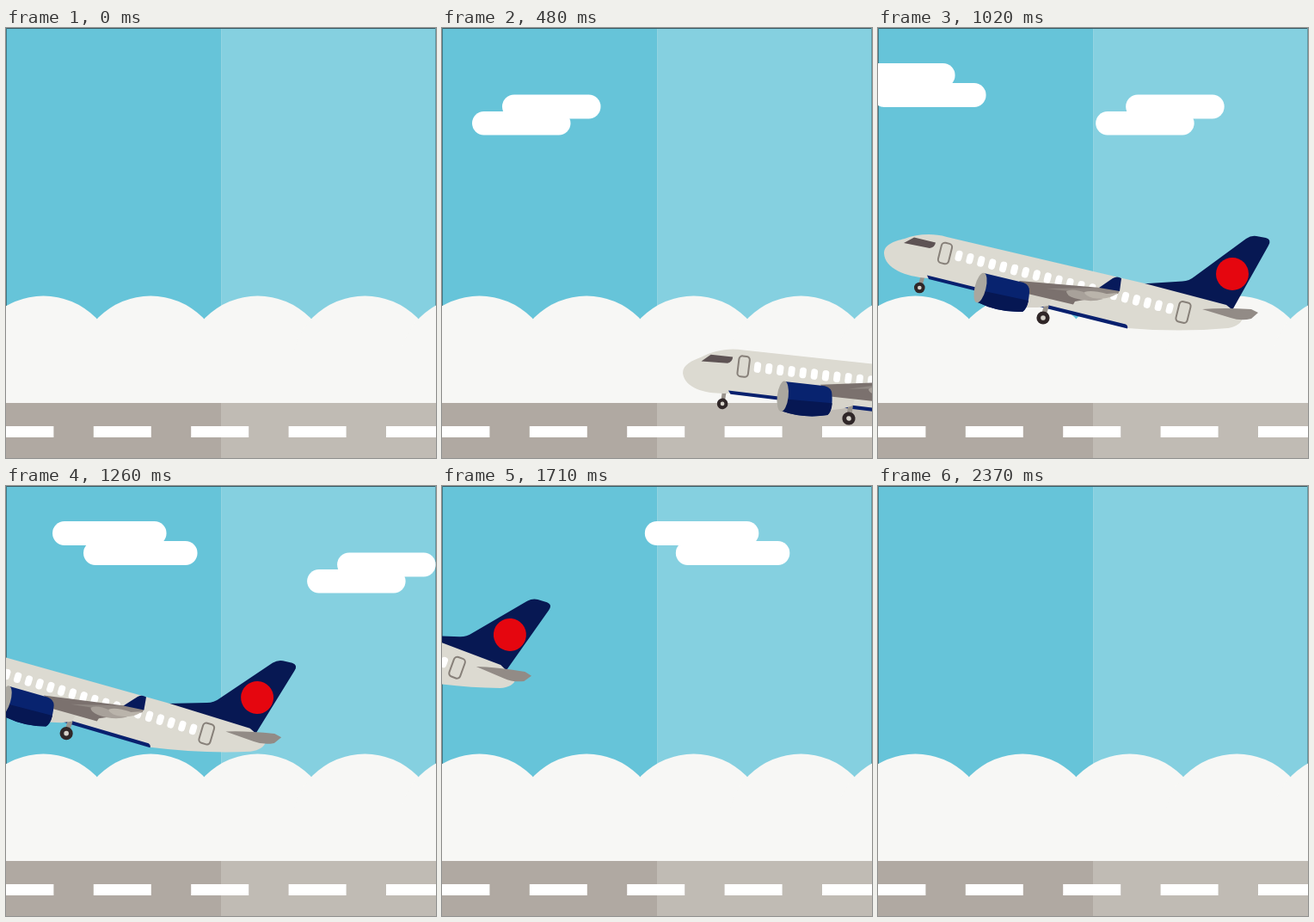
An HTML page with a canvas that plays this animation: 500 by 500 pixels, repeating every 2.7 s.

```html
<!DOCTYPE html>
<html lang="en">
<head>
<meta charset="utf-8">
<title>Take-off</title>
<style>
  html, body { margin: 0; width: 100%; height: 100%; overflow: hidden; }
  canvas { display: block; width: 500px; height: 500px; }
</style>
</head>
<body>
<canvas id="stage" width="500" height="500"></canvas>
<script>
const ctx = document.getElementById('stage').getContext('2d');
const LOOP = 2700, STEP = 30, DRIFT = 0.404;
const TILT = 13.66;               // pitch at which the plane is drawn, degrees
const PIVOT = { x: 192, y: 337 }; // main wheel in plane coordinates
const rad = deg => deg * Math.PI / 180;

// time, main wheel x, main wheel y, pitch
const flight = [
  [0, 728, 470, 0],
  [380, 526, 470, 5.2],
  [480, 473, 454, 6.6],
  [720, 347, 399, 9.8],
  [1020, 192, 337, TILT],
  [1500, -48, 239.7, 18.2],
  [1980, -264.6, 152.9, 21.2],
  [2700, -570, 30, 25]
];

function slope(i, c) {
  const a = flight[Math.max(i - 1, 0)], b = flight[Math.min(i + 1, flight.length - 1)];
  return (b[c] - a[c]) / (b[0] - a[0]);
}

function poseAt(t) {
  let i = 0;
  while (i < flight.length - 2 && t >= flight[i + 1][0]) i++;
  const a = flight[i], b = flight[i + 1], h = b[0] - a[0], u = (t - a[0]) / h;
  const s = u * u * (3 - 2 * u);
  return [1, 2, 3].map(c =>
    a[c] + (b[c] - a[c]) * s +
    h * u * (1 - u) * ((1 - u) * slope(i, c) - u * slope(i + 1, c)));
}

function fillPath(color, d) {
  ctx.fillStyle = color;
  ctx.fill(new Path2D(d));
}

function rect(color, x, y, w, h) {
  ctx.fillStyle = color;
  ctx.fillRect(x, y, w, h);
}

function disc(color, x, y, r) {
  ctx.fillStyle = color;
  ctx.beginPath();
  ctx.arc(x, y, r, 0, 7);
  ctx.fill();
}

function pill(x, y, w, h) {
  ctx.fillStyle = '#fff';
  ctx.beginPath();
  ctx.roundRect(x, y, w, h, h / 2);
  ctx.fill();
}

function tiltedBox(x, y, w, h, r) {
  ctx.save();
  ctx.translate(x, y);
  ctx.rotate(rad(14));
  ctx.beginPath();
  ctx.roundRect(-w / 2, -h / 2, w, h, r);
  ctx.restore();
}

function drawSky() {
  rect('#66c4d9', 0, 0, 250, 500);
  rect('#85d0e0', 250, 0, 250, 500);
  rect('#93d4e1', 250, 0, 1, 340);
  rect('#3b5a63', 0, 0, 500, 1);
  rect('#3f7885', 0, 0, 1, 330);
  rect('#609aa6', 499, 0, 1, 330);
}

function drawGround() {
  for (let i = 0; i < 5; i++) disc('#f7f7f5', 43.5 + 124.6 * i, 397.2, 85.7);
  rect('#f7f7f5', 0, 375, 500, 61);
  rect('#b0a9a2', 0, 436, 250, 64);
  rect('#c0bbb4', 250, 436, 250, 64);
  for (let i = 0; i < 5; i++) rect('#fff', -11.6 + 113.4 * i, 463, 67, 13);
}

function drawClouds(t) {
  const low = 35 + DRIFT * (t - 480), high = 151 + DRIFT * (t - 1500);
  pill(low + 35, 77.5, 114.5, 28);
  pill(low, 97, 114.5, 27.5);
  pill(high, 41, 132.5, 28);
  pill(high + 36, 64, 132.5, 28);
}

function drawGear(x, y, r, topX, topY) {
  ctx.strokeStyle = '#9a948d';
  ctx.lineWidth = r * 0.75;
  ctx.beginPath();
  ctx.moveTo(topX, topY);
  ctx.lineTo(x, y);
  ctx.stroke();
  disc('#302728', x, y, r);
  disc('#d6d2ca', x, y, r * 0.37);
}

function drawDoor(x, y, w, h) {
  ctx.strokeStyle = '#878079';
  ctx.lineWidth = 2;
  tiltedBox(x, y, w, h, 4);
  ctx.stroke();
}

function drawTail() {
  fillPath('#071853', 'M306 297.5L354 294.5Q362 294 368 289L428 245Q434 241 440 242L451 244Q458 246 454 253L412 328Z');
  disc('#e5060f', 412, 286, 19);
}

function drawBody() {
  fillPath('#dcdad1', 'M7 262C7 252 18 248 31 245C45 240 62 238 80 243L310 297L405 322L424 337Q422 346 407 349Q350 354 290 349L58 291C32 289 8 280 7 262Z');
  fillPath('#5e5354', 'M30 250L42 243.5L67 249.5Q66 255 60 256Z');
  fillPath('#08206e', 'M57 287.5L288 344.5Q291 346 290 349.5L59 292Z');
  drawDoor(78, 262, 12.5, 24);
  drawDoor(355, 330.5, 13.5, 24);
  ctx.fillStyle = '#fff';
  for (let i = 0; i < 20; i++) {
    tiltedBox(94 + 12.9 * i, 265 + 3.21 * i, 7.8, 12.5, 3.5);
    ctx.fill();
  }
  fillPath('#928b86', 'M377 327Q400 325 434 327L442 331L434 338Q422 341 410 337Z');
}

function drawWing() {
  fillPath('#d6d3ca', 'M168 304L203 313L198 323L186 325L168 325Z');
  fillPath('#7b716e', 'M164 294L258 302L281 305L279 309L229 318L227 321.5L174 309Z');
  fillPath('#8f8782', 'M196 303L260 302L281 305L278 309L240 308Z');
  fillPath('#a8a19a', 'M219 306Q226 302 242 308L262 315Q246 320 228 314Q219 311 219 306Z');
  fillPath('#bab4ab', 'M240 307Q248 304 266 309L279 308Q268 317 250 314Q240 311 240 307Z');
  fillPath('#071a5b', 'M257 302L273 291Q278 288 283 291L281 306Z');
}

function drawEngine() {
  fillPath('#08236f', 'M123 285L169 296Q177 299 176 307Q175 325 168 330Q140 331 116 319Z');
  fillPath('#061753', 'M119 305L175 317Q173 327 168 330Q140 331 116 319Z');
  ctx.fillStyle = '#aaa79f';
  ctx.beginPath();
  ctx.ellipse(119, 302, 6.5, 17.8, rad(TILT), 0, 7);
  ctx.fill();
}

function drawPlane(t) {
  const [x, y, pitch] = poseAt(t);
  ctx.save();
  ctx.translate(x, y);
  ctx.rotate(rad(pitch - TILT));
  ctx.translate(-PIVOT.x, -PIVOT.y);
  drawTail();
  drawGear(48.3, 302, 6.3, 52, 289);
  drawBody();
  drawGear(PIVOT.x, PIVOT.y, 7.6, 196, 322);
  drawWing();
  drawEngine();
  ctx.restore();
}

function frame(now) {
  const t = Math.floor((now % LOOP) / STEP) * STEP;
  drawSky();
  drawGround();
  drawClouds(t);
  drawPlane(t);
  requestAnimationFrame(frame);
}
frame(0);
</script>
</body>
</html>
```
